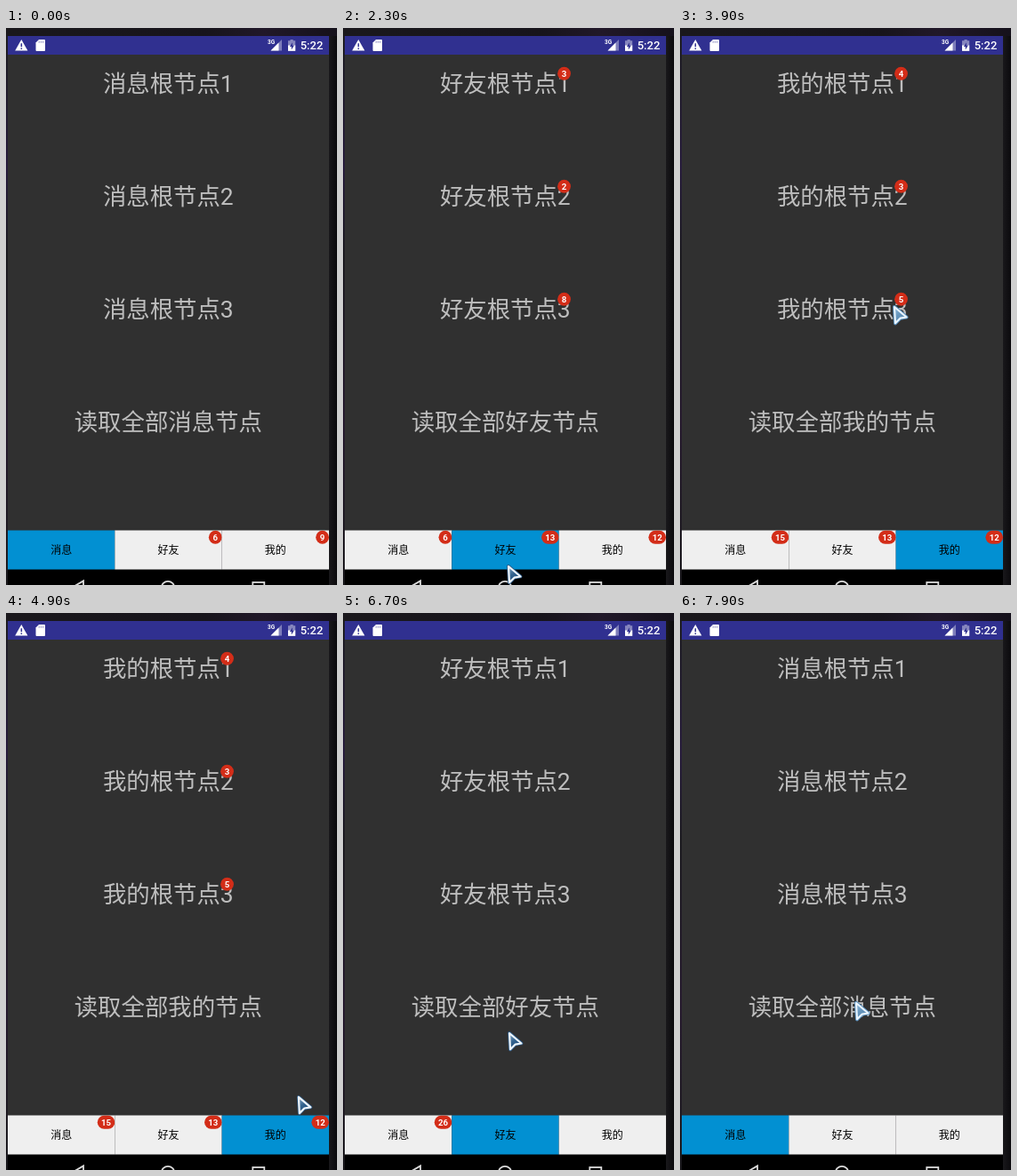
An HTML page for the animation above (8 s loop, 372 px wide and 627 px high).

```html
<!DOCTYPE html>
<html lang="zh-CN">
<head>
<meta charset="utf-8">
<title>红点节点</title>
<style>
  html, body { margin: 0; width: 100%; height: 100%; overflow: hidden; background: #0d0c10; }
  svg { display: block; width: 372px; height: 627px; }
  text { font-family: Roboto, "Noto Sans CJK SC", "Noto Sans CJK", sans-serif; text-anchor: middle; }
  .row { font-size: 26.4px; fill: #bebebe; }
  .tab { font-size: 12px; fill: #000; }
  .badge rect { fill: #d32d18; }
  .badge text { font-size: 9.6px; font-weight: 700; fill: #fff; }
</style>
</head>
<body>
<svg viewBox="0 0 372 627">
  <defs>
    <linearGradient id="top"><stop offset="0" stop-color="#1a181c"/><stop offset=".6" stop-color="#17141b"/><stop offset=".78" stop-color="#211829"/><stop offset="1" stop-color="#15111b"/></linearGradient>
    <linearGradient id="left" x2="0" y2="1"><stop offset="0" stop-color="#1c1b20"/><stop offset=".24" stop-color="#271c3c"/><stop offset=".4" stop-color="#1b1a1f"/><stop offset=".7" stop-color="#261a2e"/><stop offset="1" stop-color="#19181b"/></linearGradient>
    <linearGradient id="right"><stop offset="0" stop-color="#19181b"/><stop offset="1" stop-color="#0b0a0d"/></linearGradient>
    <linearGradient id="blue" x2=".6" y2="1"><stop offset="0" stop-color="#86a9c8"/><stop offset=".5" stop-color="#34648f"/><stop offset="1" stop-color="#1c4a78"/></linearGradient>
    <clipPath id="screen"><rect x="2" y="30" width="361" height="536"/></clipPath>
    <path id="arrow" d="M2 2 15.5 13.5 8.5 14.7 3 20.3Z" stroke-linejoin="round"/>
  </defs>
  <rect width="372" height="10" fill="url(#top)"/>
  <rect y="9" width="2" height="618" fill="url(#left)"/>
  <rect x="363" y="9" width="9" height="618" fill="url(#right)"/>
  <rect x="2" y="9" width="361" height="21" fill="#303090"/>
  <rect x="2" y="30" width="361" height="536" fill="#303030"/>
  <rect x="2" y="609" width="361" height="18" fill="#000"/>

  <g fill="#fff">
    <path d="M17.3 13 24.4 25.4H10.2Z"/>
    <path d="M16.6 17.3h1.5v4h-1.5zM16.6 22.5h1.5v1.5h-1.5z" fill="#303090"/>
    <path d="M37 13h6q1 0 1 1v11q0 1-1 1h-8.5q-1 0-1-1v-8.5z"/>
    <path d="M37.2 14.5v2.4M39.4 14.5v2.4M41.6 14.5v2.4" stroke="#8d8dc0" stroke-width=".9"/>
    <text x="298.2" y="18.2" font-size="6.5" font-weight="700">3G</text>
    <path d="M310 13v12.5h-12.5z" opacity=".38"/>
    <path d="M306.5 16.5v9h-9z"/>
    <path d="M319.5 13h3.2v1.2h2.5v11.6h-8.2V14.2h2.5z" opacity=".42"/>
    <path d="M317 19.5h8.2v6.3H317z"/>
    <path d="M321.9 16.3l-3 4.7h1.9v3.4l3.1-5h-2z" fill="#303090"/>
    <text x="343.5" y="24.2" font-size="13" font-weight="500">5:22</text>
  </g>

  <g fill="none" stroke="#dcdcdc" stroke-width="1.8">
    <path d="M87 622.4 76.5 628.5 87 635Z"/>
    <circle cx="182" cy="630" r="7.2"/>
    <rect x="277.3" y="624" width="13" height="13"/>
  </g>

  <g id="pages" clip-path="url(#screen)"></g>
  <g id="tabs"></g>
  <g id="cursor">
    <use href="#arrow" fill="none" stroke="#2c5a86" stroke-width="3.8"/>
    <use href="#arrow" fill="url(#blue)" stroke="#eef5fb" stroke-width="2.2"/>
    <g id="glow">
      <use href="#arrow" fill="none" stroke="#8fd0ff" stroke-width="4"/>
      <use href="#arrow" fill="#a4d4f5" stroke="#e8f5ff" stroke-width="1.8"/>
    </g>
  </g>
</svg>
<script>
const LOOP = 8000, STEP = 100, LAG = 100;
const LEFT = 2, WIDTH = 361, TAB = WIDTH / 3, ROW = 127;
const names = ['消息', '好友', '我的'];
const rows = [0, 1, 2];

// Pointer stops; a tap opens a tab, reads the page or does nothing
const stops = [
  { t: 1500, x: 120, y: 561 },
  { t: 1600, x: 148, y: 508 },
  { t: 2100, x: 184, y: 604, tap: 1 },
  { t: 2900, x: 280, y: 578, tap: 2 },
  { t: 3900, x: 239, y: 312, tap: 'none' },
  { t: 4400, x: 242, y: 68 },
  { t: 4800, x: 341, y: 555 },
  { t: 5300, x: 205, y: 438, tap: 'read' },
  { t: 5800, x: 218, y: 512 },
  { t: 6100, x: 185, y: 580, tap: 1 },
  { t: 6400, x: 190, y: 440, tap: 'read' },
  { t: 6700, x: 185, y: 471 },
  { t: 7100, x: 72, y: 580, tap: 0 },
  { t: 7800, x: 196, y: 437, tap: 'read' }
];
const ENTER = 1200;
const taps = stops.filter(s => 'tap' in s);

const initial = [[0, 0, 0], [3, 2, 1], [4, 3, 2]];
const arrivals = [
  { t: 100, tab: 2, add: [0, 0, 3] },
  { t: 900, tab: 0, add: [4, 2, 0] },
  { t: 2200, tab: 1, add: [0, 0, 7] },
  { t: 3300, tab: 0, add: [0, 0, 9] },
  { t: 5400, tab: 0, add: [5, 0, 0] },
  { t: 6300, tab: 0, add: [0, 6, 0] }
];

const $ = id => document.getElementById(id);
const clamp = k => Math.min(1, Math.max(0, k));
const smooth = k => k * k * (3 - 2 * k);
const slide = k => 1 - (1 - k) ** 4;
const mix = (a, b, k) => a + (b - a) * k;

function make(tag, parent, attrs = {}, text = '') {
  const el = document.createElementNS('http://www.w3.org/2000/svg', tag);
  for (const k in attrs) el.setAttribute(k, attrs[k]);
  el.textContent = text;
  return parent.appendChild(el);
}

function makeBadge(parent, right, y) {
  const g = make('g', parent, { class: 'badge' });
  const box = make('rect', g, { y: y - 7.5, height: 15, rx: 7.5 });
  const label = make('text', g, { y: y + 3.5 });
  return n => {
    const w = n > 9 ? 19.6 : 14.8;
    g.style.display = n ? '' : 'none';
    box.setAttribute('x', right - w);
    box.setAttribute('width', w);
    label.setAttribute('x', right - w / 2);
    label.textContent = n;
  };
}

const pages = names.map(name => {
  const g = make('g', $('pages'));
  const badges = rows.map(i => {
    make('text', g, { class: 'row', x: 182.3, y: 72 + ROW * i }, name + '根节点' + (i + 1));
    return makeBadge(g, 255.9, 51.2 + ROW * i);
  });
  make('text', g, { class: 'row', x: 182.3, y: 72 + ROW * 3 }, '读取全部' + name + '节点');
  return { g, badges };
});

const tabs = names.map((name, i) => {
  const x = LEFT + TAB * i;
  const bg = make('rect', $('tabs'), { x, y: 565.5, width: TAB, height: 44 });
  make('text', $('tabs'), { class: 'tab', x: x + TAB / 2, y: 592 }, name);
  return { bg, badge: makeBadge($('tabs'), x + TAB, 573.2) };
});

// Replays everything up to t
function stateAt(t) {
  const counts = initial.map(c => [...c]);
  let active = 0, pos = 0;
  for (const a of arrivals)
    if (t >= a.t) a.add.forEach((n, i) => counts[a.tab][i] += n);
  for (const { t: at, tap } of taps) {
    if (t < at + LAG) break;
    if (tap === 'read') counts[active].fill(0);
    else if (tap !== 'none') {
      active = tap;
      pos = mix(pos, active, slide(clamp((t - at) / (2 * LAG))));
    }
  }
  return { counts, active, pos };
}

function pointerAt(t) {
  const i = stops.findIndex(s => s.t > t);
  if (i < 1) return i ? stops[stops.length - 1] : stops[0];
  const a = stops[i - 1], b = stops[i];
  const rest = 'tap' in a ? Math.min(300, (b.t - a.t) / 2) : 0;
  const k = smooth(clamp((t - a.t - rest) / (b.t - a.t - rest)));
  return { x: mix(a.x, b.x, k), y: mix(a.y, b.y, k) };
}

function render(t) {
  const { counts, active, pos } = stateAt(t);
  pages.forEach((p, i) => {
    p.g.setAttribute('transform', `translate(${(i - pos) * WIDTH} 0)`);
    p.badges.forEach((set, j) => set(counts[i][j]));
  });
  tabs.forEach((tab, i) => {
    tab.bg.setAttribute('fill', i === active ? '#0290d2' : '#efefef');
    tab.badge(counts[i].reduce((a, b) => a + b));
  });
  const { x, y } = pointerAt(t);
  const pressed = taps.find(s => t >= s.t && t < s.t + 2 * LAG);
  $('cursor').style.display = t < ENTER ? 'none' : '';
  $('cursor').setAttribute('transform', `translate(${x} ${y})`);
  $('glow').setAttribute('opacity', !pressed ? 0 : pressed.tap > 0 ? 1 : .45);
}

const start = performance.now();
function tick() {
  const t = (performance.now() - start) % LOOP;
  render(Math.floor(t / STEP) * STEP);
  requestAnimationFrame(tick);
}
tick();
</script>
</body>
</html>
```
